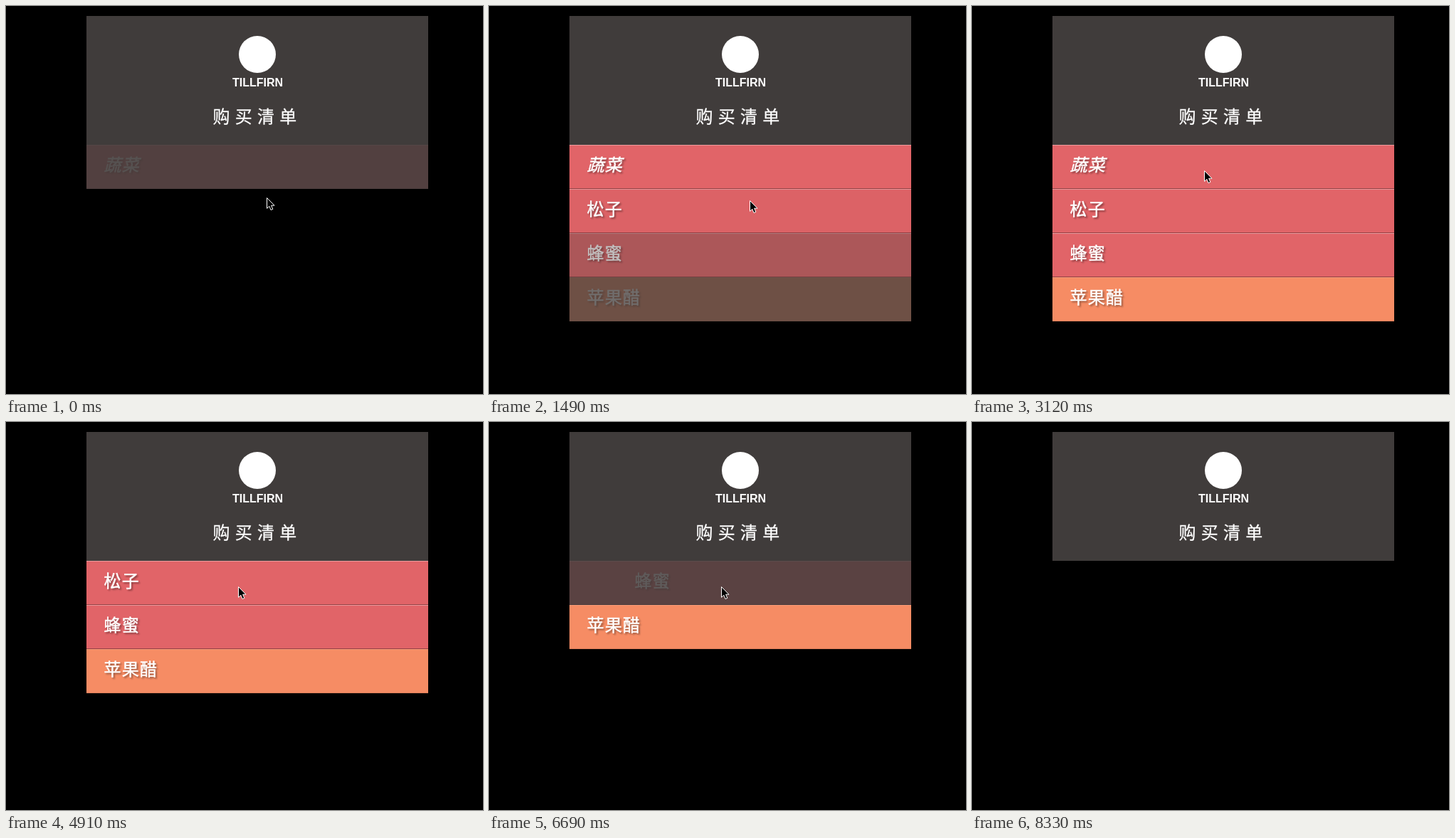
Animation, 670 px wide and 545 px high, one loop 9180 ms. Source, as an HTML page:

```html
<!DOCTYPE html>
<html lang="zh-CN">
<head>
<meta charset="utf-8">
<title>购买清单</title>
<style>
  html, body { margin: 0; width: 100%; height: 100%; overflow: hidden; background: #000; }
  svg { display: block; width: 670px; height: 545px; }
  .cjk { font: 24px "Noto Sans CJK SC", "Noto Sans CJK", sans-serif; fill: #fff; stroke: #fff; }
  .title { letter-spacing: 7.2px; stroke-width: .3px; }
  .item { font-weight: 500; letter-spacing: 1.2px; stroke-width: .5px; filter: drop-shadow(2px 2px 1px rgba(0, 0, 0, .35)); }
  .brand { font: bold 16px "Liberation Sans", Arial, sans-serif; fill: #fff; text-anchor: middle; }
</style>
</head>
<body>
<svg viewBox="0 0 670 545" xmlns="http://www.w3.org/2000/svg">
  <rect width="670" height="545" fill="#000"/>
  <rect x="113" y="14" width="480" height="181" fill="#403c3b"/>
  <circle cx="353" cy="68" r="26" fill="#fff"/>
  <text class="brand" x="353.5" y="112.5">TILLFIRN</text>
  <text class="cjk title" x="290.6" y="164">购买清单</text>
  <g id="list"></g>
  <path id="cursor" d="M.5 .5V15.3L3.8 12.2L6 17.5L8.8 16.3L6.6 11.2H11Z" fill="#000" stroke="#fff" stroke-linejoin="round"/>
</svg>
<script>
const LOOP = 9180, TICK = 148.7;
const TOP = 195, ROW = 62, TEXT_X = 137.5;
const FADE_IN = 1600, FADE_OUT = 530, SLIDE = 80;
const RED = '#e16468', ORANGE = '#f68c64';

const items = [
  { label: '蔬菜', color: RED, enter: -348, leave: 4240, italic: true },
  { label: '松子', color: RED, enter: 60, leave: 5385 },
  { label: '蜂蜜', color: RED, enter: 505, leave: 6301 },
  { label: '苹果醋', color: ORANGE, enter: 952, leave: 7200 }
];

// time, x, y
const cursorPath = [
  [0, 366, 269], [148, 366, 273], [2440, 366, 273],
  [3110, 326, 231], [7700, 326, 231], [8170, 372, 396]
];
const CURSOR_END = 8320;

const list = document.getElementById('list');
const cursor = document.getElementById('cursor');

const clamp = v => Math.min(1, Math.max(0, v));
const swing = v => 0.5 - Math.cos(Math.PI * clamp(v)) / 2;

function add(parent, tag, attrs) {
  const el = document.createElementNS('http://www.w3.org/2000/svg', tag);
  for (const key in attrs) el.setAttribute(key, attrs[key]);
  return parent.appendChild(el);
}

const bar = (parent, y, height, fill, opacity = 1) =>
  add(parent, 'rect', { x: 113, y, width: 480, height, fill, 'fill-opacity': opacity });

for (const item of items) {
  const edge = item.color === RED ? 0.35 : 0.12;
  item.row = add(list, 'g');
  bar(item.row, 0, ROW, '#403c3b');
  item.face = add(item.row, 'g');
  bar(item.face, 0, ROW, item.color);
  bar(item.face, 0, 1, '#fff', edge);
  bar(item.face, ROW - 1, 1, '#000', edge);
  item.text = add(item.face, 'text', { class: 'cjk item', x: TEXT_X, y: 37 });
  if (item.italic) item.text.style.fontStyle = 'italic';
  item.text.textContent = item.label;
}

function drawItems(t) {
  let y = TOP;
  for (const { row, face, text, enter, leave } of items) {
    const shown = t >= enter && t < leave + FADE_OUT;
    row.style.display = shown ? '' : 'none';
    if (!shown) continue;
    const out = swing((t - leave) / FADE_OUT);
    row.setAttribute('transform', `translate(0 ${y})`);
    face.setAttribute('opacity', swing((t - enter) / FADE_IN) * (1 - out));
    text.setAttribute('x', TEXT_X + SLIDE * out);
    y += ROW;
  }
}

function drawCursor(t) {
  cursor.style.display = t < CURSOR_END ? '' : 'none';
  let i = 0;
  while (i < cursorPath.length - 2 && t >= cursorPath[i + 1][0]) i++;
  const [t0, x0, y0] = cursorPath[i], [t1, x1, y1] = cursorPath[i + 1];
  const p = swing((t - t0) / (t1 - t0));
  const x = Math.round(x0 + (x1 - x0) * p), y = Math.round(y0 + (y1 - y0) * p);
  cursor.setAttribute('transform', `translate(${x} ${y})`);
}

// The picture advances in even ticks, like a screen recording.
function draw(ms) {
  const t = Math.floor((ms % LOOP + 5) / TICK) * TICK;
  drawItems(t);
  drawCursor(t);
}

const start = performance.now();
function loop() {
  draw(performance.now() - start);
  requestAnimationFrame(loop);
}
loop();
</script>
</body>
</html>
```
